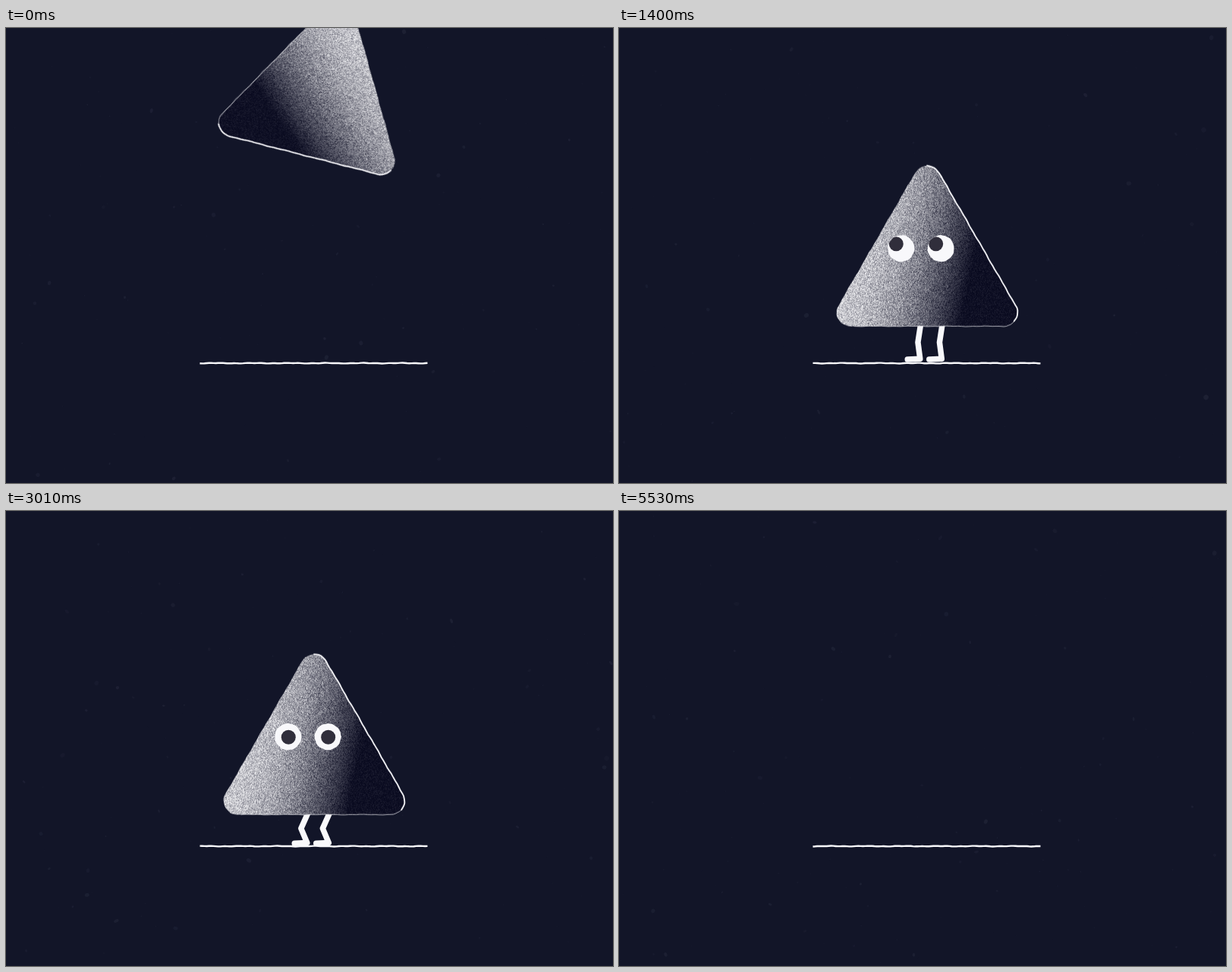
An HTML page with a canvas for the animation above (5600 ms loop, 800 by 600 pixels).

```html
<!DOCTYPE html>
<html lang="en">
<head>
<meta charset="utf-8">
<title>Falling triangle</title>
<style>
  html, body { margin: 0; width: 100%; height: 100%; overflow: hidden; background: #121528; }
  canvas { display: block; width: 800px; height: 600px; }
</style>
</head>
<body>
<canvas id="stage" width="800" height="600"></canvas>
<script>
const ctx = document.getElementById('stage').getContext('2d');
const LOOP = 5600, STEP = 70, VARIANTS = 4;
const BG = '#121528', WHITE = '#f8f8fb', PUPIL = '#302e3b';
const FLOOR = 442, SIT = 47;
const REST = { x: 406, y: 316.7 };
const RAD = Math.PI / 180;

const ramp = (t, from, to) => Math.min(1, Math.max(0, (t - from) / (to - from)));
const drop = (t, from) => 14 * (Math.max(0, t - from) / STEP) ** 2;
const wobble = (s, v) =>
  0.25 * Math.sin(s * 0.13 + v * 2.1) + 0.2 * Math.sin(s * 0.37 + v * 4.7);

function random(seed) {
  return () => {
    seed = seed + 0x6D2B79F5 | 0;
    let r = Math.imul(seed ^ seed >>> 15, 1 | seed);
    r = r + Math.imul(r ^ r >>> 7, 61 | r) ^ r;
    return ((r ^ r >>> 14) >>> 0) / 4294967296;
  };
}

function layer(w, h) {
  const c = document.createElement('canvas');
  c.width = w;
  c.height = h;
  return c.getContext('2d');
}

// Faint dust on the background
function makePaper(v) {
  const g = layer(800, 600), rnd = random(40 + v);
  g.fillStyle = BG;
  g.fillRect(0, 0, 800, 600);
  for (let i = 0; i < 140; i++) {
    const r = 0.5 + rnd() ** 4 * 3;
    g.fillStyle = `rgba(120,124,150,${0.04 + rnd() * 0.07})`;
    g.beginPath();
    g.ellipse(rnd() * 800, rnd() * 600, r, r * (0.5 + rnd() * 0.5), rnd() * 3, 0, 7);
    g.fill();
  }
  return g.canvas;
}

const SIZE = 300, MID = SIZE / 2;
const ARC = 12, EDGE = 40;

// Rounded triangle around its centre, clockwise from the left of the apex.
function trianglePoints(v) {
  const reach = 116.7, pts = [];
  const corner = i => [reach * Math.cos((120 * i - 90) * RAD), reach * Math.sin((120 * i - 90) * RAD)];
  const add = (x, y, deg) => {
    const r = 18.2 + wobble(pts.length * 5, v);
    pts.push([x + r * Math.cos(deg * RAD), y + r * Math.sin(deg * RAD)]);
  };
  for (let i = 0; i < 3; i++) {
    const [x, y] = corner(i), [nx, ny] = corner(i + 1), from = 210 + 120 * i;
    for (let k = 0; k < ARC; k++) add(x, y, from + k * 120 / ARC);
    for (let k = 0; k < EDGE; k++) add(x + (nx - x) * k / EDGE, y + (ny - y) * k / EDGE, from + 120);
  }
  return pts;
}

function trace(g, pts) {
  g.beginPath();
  pts.forEach(([x, y]) => g.lineTo(x, y));
}

function makeBody(v) {
  const g = layer(SIZE, SIZE), rnd = random(7 + v);
  const img = g.createImageData(SIZE, SIZE), d = img.data;
  for (let i = 0; i < d.length; i += 4) {
    const p = i / 4, x = p % SIZE - MID, y = Math.floor(p / SIZE) - MID;
    const light = ramp(-0.97 * x - 0.2 * y, -57, 110);
    const shade = 0.02 + 0.82 * Math.sin(light * Math.PI / 2);
    const grain = (rnd() + rnd() - 1) * (0.08 + 0.5 * Math.min(shade, 0.5));
    const k = Math.min(1, Math.max(0, shade + grain));
    d[i] = 9 + 227 * k;
    d[i + 1] = 10 + 226 * k;
    d[i + 2] = 31 + 208 * k;
    d[i + 3] = 255;
  }
  g.putImageData(img, 0, 0);

  const pts = trianglePoints(v);
  g.translate(MID, MID);
  g.globalCompositeOperation = 'destination-in';
  trace(g, pts);
  g.fill();
  g.globalCompositeOperation = 'source-over';
  g.lineCap = g.lineJoin = 'round';
  g.strokeStyle = WHITE;
  const line = (from, to, width, alpha) => {
    g.lineWidth = width;
    g.globalAlpha = alpha;
    trace(g, pts.slice(from, to));
    g.stroke();
  };
  const side = ARC + EDGE;
  line(6, side + 8, 1.8, 1);
  line(side + 7, 2 * side, 1, 0.7);
  return g.canvas;
}

const each = make => Array.from({ length: VARIANTS }, (_, v) => make(v));
const papers = each(makePaper), bodies = each(makeBody);

// Bounce off the floor and spin upright, land, squat, sit, fall through.
function bodyPose(t) {
  const n = t / STEP, peak = 5.5, landed = 12;
  if (n < landed) {
    const pull = n < peak ? 7.7 : 4.8;
    return {
      x: 411 - 5 * n / 11 - 26.5 * Math.sin(Math.PI * Math.min(n, 11) / 11),
      y: n < 1 ? 93.5 : 167 + pull * (n - peak) ** 2,
      turn: Math.min(360, 134.4 + 25.24 * n)
    };
  }
  const land = 13 * (1 - ramp(n, landed, landed + 2)) ** 2;
  const squat = 7 * ramp(t, 2380, 2520);
  const sit = (SIT - 7) * ramp(t, 3010, 3290) ** 2;
  return { x: REST.x, y: REST.y + land + squat + sit + drop(t, 3430), turn: 0 };
}

// Pupils look up, left, right, then ahead.
function lookAt(t) {
  const views = [[-2.5, -11.8], [-10.5, 0], [10.5, 0], [0.5, 0.5]];
  const turns = [1330, 1960, 2380];
  return turns.reduce((pos, from, i) => {
    const k = ramp(t, from, from + 140);
    return pos.map((p, j) => p + (views[i + 1][j] - p) * k);
  }, views[0]);
}

function drawLegs(x, y, grow, v) {
  const hipY = y + 76, ankleY = Math.min(437.5, hipY + 43.5 * grow);
  const half = (ankleY - hipY) / 2;
  const bend = 0.72 * Math.sqrt(Math.max(0, 495 - half * half)) * grow;
  ctx.strokeStyle = WHITE;
  ctx.lineWidth = 7.5;
  ctx.lineJoin = ctx.lineCap = 'round';
  for (const hip of [x - 8.7, x + 19.8]) {
    ctx.beginPath();
    ctx.moveTo(hip, hipY - 6);
    ctx.lineTo(hip, hipY);
    ctx.lineTo(hip - bend + wobble(v, 1), hipY + half);
    ctx.lineTo(hip - 0.5, ankleY);
    ctx.lineTo(hip - 17 * grow, ankleY + 0.8);
    ctx.stroke();
  }
}

function drawEyes(x, y, open, look, v) {
  for (const dx of [-34.2, 18.2]) {
    ctx.save();
    ctx.translate(x + dx, y);
    ctx.scale(1, open);
    ctx.beginPath();
    for (let deg = 0; deg < 360; deg += 10) {
      const r = 17.5 + wobble(deg, v + dx);
      ctx.lineTo(r * Math.cos(deg * RAD), r * Math.sin(deg * RAD));
    }
    ctx.closePath();
    ctx.fillStyle = WHITE;
    ctx.fill();
    ctx.clip();
    ctx.beginPath();
    ctx.arc(look[0], look[1], 9.5, 0, 7);
    ctx.fillStyle = PUPIL;
    ctx.fill();
    ctx.restore();
  }
}

function drawFloor(dip, v) {
  ctx.strokeStyle = WHITE;
  ctx.lineWidth = 2.4;
  ctx.lineCap = 'butt';
  ctx.beginPath();
  for (let x = 255.5; x <= 555.5; x += 3) {
    const push = dip * Math.exp(-(((x - 447) / 50) ** 2));
    ctx.lineTo(x, FLOOR + push + wobble(x, v));
  }
  ctx.stroke();
}

function draw(time) {
  const step = Math.floor(time % LOOP / STEP), t = step * STEP;
  const v = (step >> 1) % VARIANTS;
  const { x, y, turn } = bodyPose(t);
  const grow = ramp(t, 560, 770), open = ramp(t, 700, 910);
  const sink = y - REST.y;

  ctx.drawImage(papers[v], 0, 0);
  ctx.save();
  if (t > 3000) {
    ctx.beginPath();
    ctx.rect(0, 0, 800, FLOOR);
    ctx.clip();
  }
  if (grow > 0 && sink < SIT - 1) drawLegs(x, y, grow, v);
  ctx.save();
  ctx.translate(x, y);
  ctx.rotate(turn * RAD);
  ctx.drawImage(bodies[v], -MID, -MID);
  ctx.restore();
  if (open > 0) {
    const eyeY = REST.y - 26 + Math.min(sink, SIT) + drop(t, 4340);
    drawEyes(x, eyeY, open, lookAt(t), v);
  }
  ctx.restore();
  drawFloor(step === 1 ? 10 : 0, v);
}

const start = performance.now();
function tick() {
  draw(performance.now() - start);
  requestAnimationFrame(tick);
}
tick();
</script>
</body>
</html>
```
